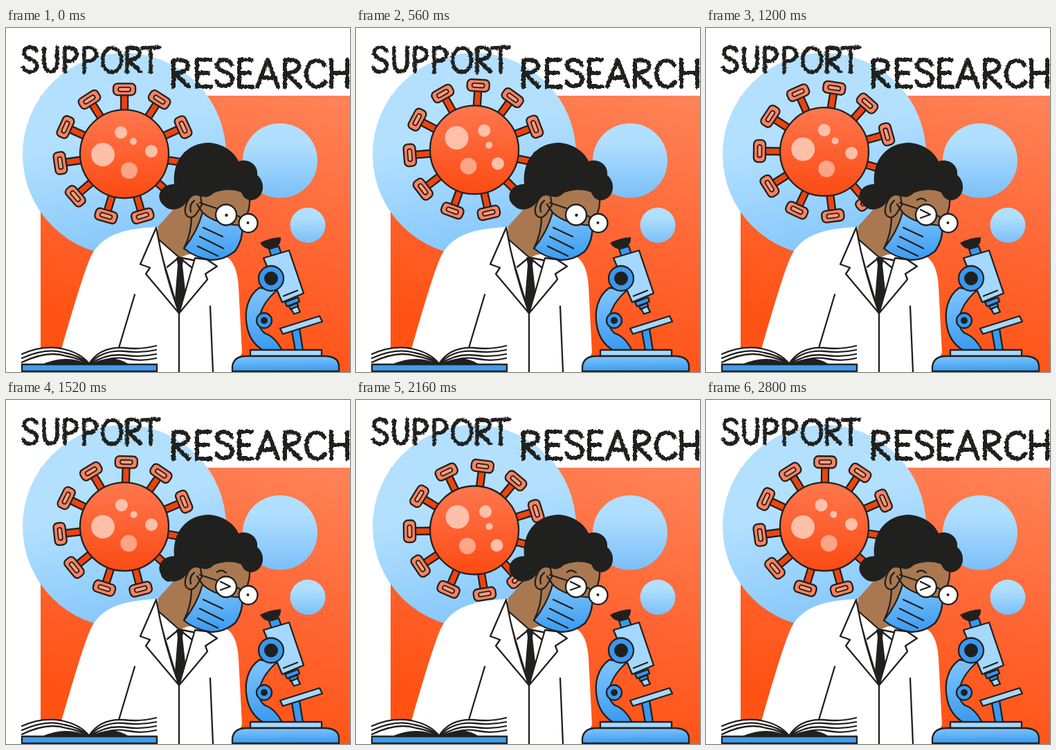
Write an HTML page that moves like this. It is 497x498 px and loops after 2880 ms.

```html
<!DOCTYPE html>
<html lang="en">
<head>
<meta charset="utf-8">
<title>Support research</title>
<style>
  html, body { margin: 0; width: 100%; height: 100%; overflow: hidden; background: #fff; }
  svg { display: block; width: 497px; height: 498px; }
  .line { fill: none; }
  .ink { fill: #20211f; stroke: none; }
  .flat { stroke: none; }
  .white { fill: #fff; }
  .sky { fill: #a5d8ff; }
  .blue { fill: #3998ef; }
  .skin { fill: #a97850; }
</style>
</head>
<body>
<svg viewBox="0 0 497 498" stroke="#20211f" stroke-width="2.3" stroke-linecap="round" stroke-linejoin="round">
  <defs>
    <linearGradient id="panel" x1="1" y1="0" x2=".7" y2="1">
      <stop stop-color="#ff8054"/><stop offset=".55" stop-color="#ff612d"/><stop offset="1" stop-color="#ff4d0c"/>
    </linearGradient>
    <linearGradient id="ball" x1="0" y1="0" x2="0" y2="1">
      <stop stop-color="#ff744a"/><stop offset="1" stop-color="#fc460d"/>
    </linearGradient>
    <linearGradient id="halo" x1=".3" y1="0" x2=".55" y2="1">
      <stop offset=".4" stop-color="#b3e0ff"/><stop offset="1" stop-color="#82c5fb"/>
    </linearGradient>
    <linearGradient id="bubble" x1="0" y1="0" x2="0" y2="1">
      <stop offset=".25" stop-color="#b1dfff"/><stop offset="1" stop-color="#7abff8"/>
    </linearGradient>
    <linearGradient id="cloth" x1=".5" y1="0" x2=".6" y2="1">
      <stop offset=".1" stop-color="#79c0fb"/><stop offset="1" stop-color="#399af0"/>
    </linearGradient>
    <pattern id="dots" width="4" height="4" patternUnits="userSpaceOnUse">
      <path d="M1 1h.01M3 3h.01" stroke="#fff" stroke-width="1.3"/>
    </pattern>
    <filter id="rough" filterUnits="userSpaceOnUse" x="0" y="0" width="497" height="110" color-interpolation-filters="sRGB">
      <feTurbulence id="noise" type="fractalNoise" baseFrequency=".3" numOctaves="2"/>
      <feDisplacementMap in="SourceGraphic" scale="4" xChannelSelector="R" yChannelSelector="G"/>
    </filter>
  </defs>

  <g class="flat">
    <path fill="url(#panel)" d="M50 98H497V498H50Z"/>
    <path fill="url(#dots)" opacity=".16" d="M50 98H497V498H50Z"/>
    <circle fill="url(#halo)" cx="171" cy="183" r="147"/>
    <circle fill="url(#bubble)" cx="396" cy="192" r="54"/>
    <circle fill="url(#bubble)" cx="436" cy="285.5" r="25.5"/>
  </g>

  <g id="virus">
    <g id="spikes"></g>
    <circle fill="url(#ball)" r="64"/>
    <circle class="flat" fill="url(#dots)" opacity=".14" r="63"/>
    <g id="spots" class="flat" fill="#ffd0bf" opacity=".85">
      <circle cx="-31" cy="1" r="17"/><circle cx="-5" cy="-31" r="9"/><circle cx="13" cy="-18" r="5"/>
      <circle cx="7" cy="24" r="12" opacity=".75"/><circle cx="39" cy="-4" r="9"/>
    </g>
  </g>

  <!-- Coat -->
  <path class="white flat" d="M217 288C165 291 137 301 122 332C113 352 95 412 80 465V498H328L341 470L336 375Q334 340 318 331L288 327Z"/>
  <path class="line" d="M186 386L163 463M295 403L299 498M250 413V498"/>
  <path class="skin flat" d="M246 258L220 287L218 303L250 333L262 328L290 325L335 300L347 272Q353 256 351 236L300 226L262 232Z"/>
  <path class="white" d="M217 303L250 332L275 337L250 413Z"/>
  <path class="line" d="M250 332L233 346M250 332L270 348"/>
  <path class="ink" d="M246 332H257L255 343L260 389L250 411L244 393L248 343Z"/>
  <path class="white" d="M217 289L194 342L208 347L202 356L250 413Q228 352 217 289Z"/>
  <path class="white" d="M273 333L250 413L291 364L288 356L305 345L290 335Z"/>

  <!-- Head -->
  <path class="line" d="M268 273Q268 298 257 319M351 240Q354 254 349 268"/>
  <path class="ink" d="M243 226C240 190 262 167 292 166C315 167 331 181 336 193C350 188 365 198 363 213C374 222 374 240 362 247C352 253 343 247 340 238C325 231 306 236 300 239Q291 248 281 243L262 250C256 262 238 268 228 257C215 246 222 226 243 226Z"/>
  <path class="skin" d="M281 243C270 237 262 246 259 261C257 273 267 279 275 269L283 256Z"/>
  <path class="line" d="M272 250Q264 256 267 266M280 253L304 261"/>
  <path fill="url(#cloth)" d="M284 267Q301 284 341 286Q343 306 331 323Q315 336 296 336Q272 332 257 319Q276 296 284 267Z"/>
  <path class="line" d="M276 255L284 267M285 289L313 302M280 302L314 319M277 316L306 330"/>
  <circle class="white" cx="350" cy="282.5" r="13.5"/>
  <circle class="white" cx="318" cy="270.5" r="15"/>
  <path class="line" d="M333 272Q336 271 339 275"/>
  <circle class="ink" cx="349.5" cy="282" r="2"/>
  <circle id="open" class="ink" cx="318.5" cy="271" r="2.2"/>
  <path id="wink" class="line" d="M310 263L324 270L310 275M305 249Q311 244 318 250"/>

  <!-- Microscope -->
  <path fill="url(#cloth)" d="M366 376C349 388 344 410 348 431Q352 455 372 467H399Q389 447 374 442C360 432 363 405 391 380Z"/>
  <path class="blue" d="M380 320L394 316L398 327L384 332Z"/>
  <path class="ink" d="M367 311Q383 303 397 303Q398 316 384 320Q373 321 367 311Z"/>
  <path class="sky" d="M372 333L409 322L430 384L399 397Z"/>
  <path class="line" d="M401 388L421 380"/>
  <path class="blue" d="M403 397L422 390L424 396L406 403Z"/>
  <path class="blue" d="M409 403L421 398L422 403L411 407Z"/>
  <path class="sky" d="M412 407L421 403L425 411L416 414Z"/>
  <circle class="blue" cx="383" cy="362.5" r="18"/>
  <circle class="ink" cx="383" cy="362.5" r="10"/>
  <circle class="blue" cx="373" cy="423.5" r="11"/>
  <circle class="ink" cx="373" cy="423.5" r="5"/>
  <path class="blue" d="M413 439L424 435L429 467H418Z"/>
  <path class="sky" d="M396 435L453 417L457 425L400 443Z"/>
  <path class="sky" d="M353 466H456V475H353Z"/>
  <path fill="url(#cloth)" d="M327 497V490Q329 475 347 475H462Q481 476 481 490V497Z"/>

  <!-- Book -->
  <path class="white flat" d="M23 471Q52 459 80 464Q108 470 120 486Q136 461 170 463Q194 466 217 460V488H23Z"/>
  <path class="ink" d="M52 487Q88 471 119 487ZM121 487Q153 470 178 487Z"/>
  <path class="line" d="M23 472Q52 459 80 464Q108 470 120 486Q136 461 170 463Q194 466 217 460M23 478Q58 462 84 470Q106 474 119 486M23 484Q60 466 87 475Q106 478 119 487M121 486Q140 465 172 468Q195 471 217 466M121 487Q145 470 174 474Q195 477 217 472M130 486Q152 474 176 479Q196 483 217 478"/>
  <path class="blue" d="M23 487H218V497H23Z"/>
  <path class="flat" fill="url(#dots)" opacity=".2" d="M24 488H217V496H24Z"/>

  <!-- Hand lettering -->
  <g class="line" role="img" aria-label="SUPPORT RESEARCH" stroke-width="5.5" filter="url(#rough)">
    <path d="M44 33C40 26 27 26 26 36C26 46 45 44 45 55C44 66 28 66 25 57
      M55 29V48C55 69 75 67 74 48V28
      M85 63V29C108 25 108 50 86 48
      M113 64V29C137 25 136 50 114 48
      M154 29C135 29 135 64 153 64C171 63 171 30 154 29Z
      M175 64V29C199 24 199 47 176 46L194 63
      M197 29L221 28M209 29V64"/>
    <path stroke-width="6" d="M242 85V47C270 42 270 66 243 65L264 85
      M295 46H276V85H296M276 65H292
      M326 53C321 43 305 44 305 54C306 65 327 62 327 74C326 87 307 87 304 77
      M355 46H337V85H356M337 65H352
      M363 85L378 46L393 85M368 72H388
      M403 85V47C430 42 430 66 404 65L425 85
      M460 54C453 42 434 46 434 66C435 87 453 90 461 78
      M470 46V85M493 46V85M470 65H493"/>
  </g>
</svg>
<script>
  const LOOP = 2880, STEP = 80, SPIKES = 11;
  const get = id => document.getElementById(id);

  get('spikes').innerHTML = Array.from({ length: SPIKES }, (_, i) => `
    <g transform="rotate(${i * 360 / SPIKES})">
      <path fill="#ee430f" d="M-5 -60V-87H5V-60Z"/>
      <rect fill="#ff8260" x="-16" y="-102" width="32" height="17" rx="6"/>
      <rect fill="#ff9c7d" x="-9" y="-96.5" width="18" height="6" rx="3" stroke-width="1.8"/>
    </g>`).join('');

  function draw(now) {
    const step = Math.floor(now % LOOP / STEP);
    const phase = step * STEP / LOOP * 2 * Math.PI;
    const turn = 20 * (1 - Math.cos(2 * phase + .07));
    const winking = step >= 12;

    get('virus').setAttribute('transform', `translate(171 ${182.3 - 6.2 * Math.sin(phase)})`);
    for (const id of ['spikes', 'spots']) get(id).setAttribute('transform', `rotate(${turn})`);
    get('open').style.display = winking ? 'none' : '';
    get('wink').style.display = winking ? '' : 'none';
    get('noise').setAttribute('seed', 1 + step % 3);
    requestAnimationFrame(() => draw(performance.now()));
  }
  draw(performance.now());
</script>
</body>
</html>
```
